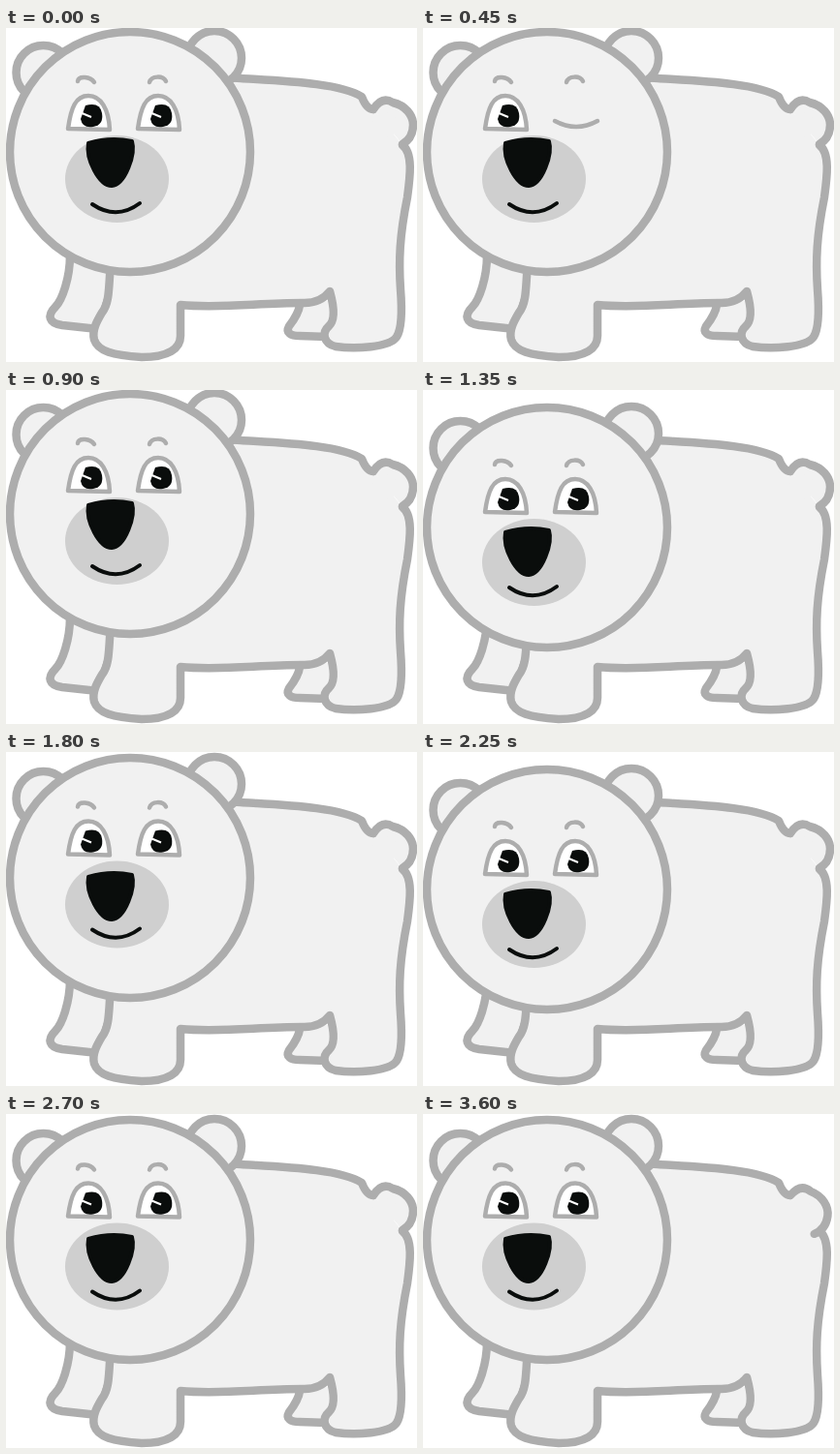
An HTML page for the animation above (4.05 s loop, 424 px wide and 345 px high).

```html
<!DOCTYPE html>
<html lang="en">
<head>
<meta charset="utf-8">
<title>Polar bear</title>
<style>
html, body { margin: 0; width: 100%; height: 100%; overflow: hidden; background: #fff; }
svg { display: block; width: 424px; height: 345px; }
.fur { fill: #f1f1f1; stroke: #adadad; stroke-width: 8.5; stroke-linejoin: round; stroke-linecap: round; }
.line { fill: none; stroke: #adadad; stroke-width: 4.5; stroke-linecap: round; }
.eye { fill: #fff; stroke: #adadad; stroke-width: 4.5; stroke-linejoin: round; }
.ink { fill: #0a0d0c; }
.pen { stroke: #0a0d0c; stroke-width: 4; stroke-linejoin: round; stroke-linecap: round; }
</style>
</head>
<body>
<svg viewBox="0 0 424 345">
  <defs>
    <g id="eye">
      <path class="eye" d="M64 104C67 82 72 70 85 70S106 84 107 105Z"/>
      <path class="ink" d="M82 80Q97 76 99 88T90 102T77 94Z"/>
      <path d="M76 87L88 92" fill="none" stroke="#fff" stroke-width="2"/>
    </g>
  </defs>
  <!-- far legs -->
  <path class="fur" d="M66 235C66 258 58 281 51 288C42 297 44 305 58 307L95 311L115 250"/>
  <path class="fur" d="M303 286Q302 295 292 308C288 315 294 318 303 318L332 319L345 280"/>
  <!-- body with near legs, open at the tail -->
  <path class="fur" d="M409 121C420 129 417 153 414 175C406 215 405 240 407 270Q410 308 403 319
    C396 330 360 332 340 329C328 326 325 315 333 308Q342 300 334 272Q324 285 305 284
    C260 284 220 290 180 286V318C180 331 168 340 140 340C110 338 95 334 91 322
    C88 312 95 301 99 294C107 284 106 268 108 240L200 49L242 52C290 55 345 57 367 71Q372 84 379 84"/>
  <g id="tail">
    <path class="fur" d="M379 84Q388 70 399 77C412 80 420 90 420 100S416 116 409 120"/>
    <circle cx="391" cy="100" r="13" fill="#f1f1f1"/>
  </g>
  <g id="head">
    <circle class="fur" cx="38.5" cy="46" r="28"/>
    <circle class="fur" cx="215" cy="31" r="28"/>
    <circle class="fur" cx="128" cy="128" r="124"/>
  </g>
  <g id="face">
    <path class="line" d="M74 55C75 49 87 50 91 56M148 56C150 49 162 49 165 55"/>
    <use href="#eye"/>
    <use href="#eye" x="72" id="open"/>
    <path class="line" id="shut" d="M136 96Q158 108 180 96"/>
    <ellipse cx="114.5" cy="156" rx="53.5" ry="45" fill="#cfcfcf"/>
    <path class="pen" d="M89 182Q114 199 138 181" fill="none"/>
  </g>
  <path class="ink pen" id="nose" d="M85 119Q108 112 130 117C134 130 123 162 109 163C96 163 82 135 85 119Z"/>
</svg>
<script>
const STEP = 450, STEPS = 9;
const $ = id => document.getElementById(id);
const drop = (id, y) => $(id).setAttribute("transform", `translate(0 ${y})`);
const show = (id, on) => { $(id).style.display = on ? "" : "none"; };

function draw() {
  const n = Math.floor(performance.now() / STEP) % STEPS;
  const wink = n === 1, nod = n === 3 || n === 5, risen = n > 3;

  show("open", !wink);
  show("shut", wink);
  drop("head", nod ? 14 : risen ? 2 : 0);
  drop("face", nod ? 22 : risen ? 1.5 : 0);
  drop("nose", nod ? 28 : risen ? 10 : 0);
  // the tail sinks over the last two steps
  $("tail").setAttribute("transform", `rotate(${4 * Math.max(0, n - 6)} 379 84)`);

  requestAnimationFrame(draw);
}
draw();
</script>
</body>
</html>
```
